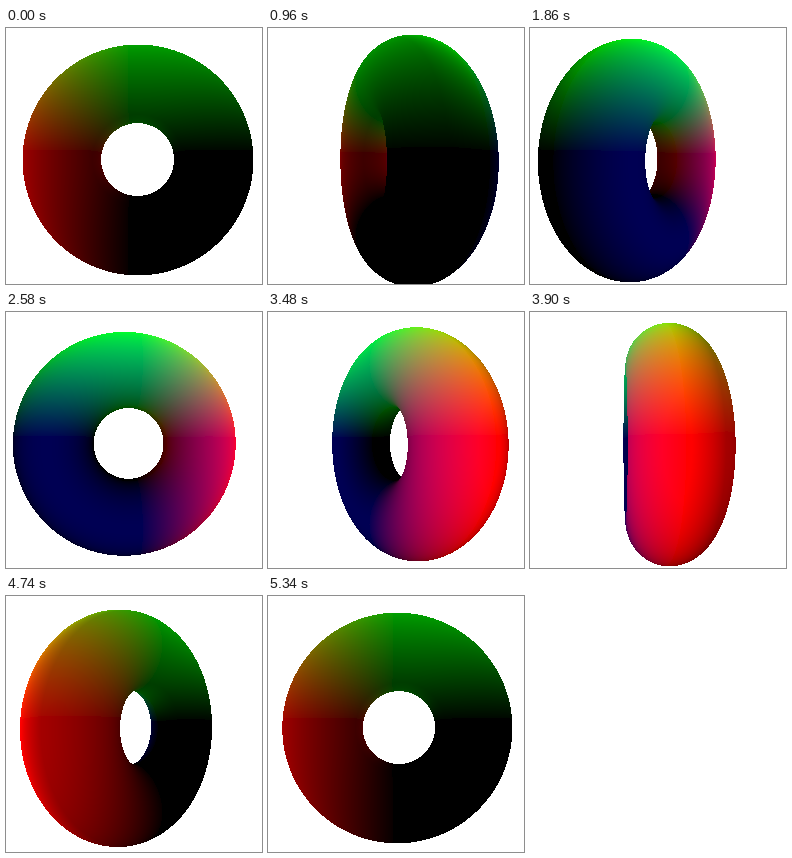
An HTML page with a canvas that plays this animation: 256 by 256 pixels, repeating every 5400 ms.

```html
<!DOCTYPE html>
<html lang="en">
<head>
<meta charset="utf-8">
<title>Turning torus</title>
<style>
html, body { margin: 0; width: 100%; height: 100%; overflow: hidden; background: #fff; }
canvas { display: block; width: 256px; height: 256px; }
</style>
</head>
<body>
<canvas id="stage" width="256" height="256"></canvas>
<script>
const SIZE = 256, HALF = SIZE / 2;
const LOOP = 5400, STEP = 60;
const RING = 72.6, TUBE = 36.2, SHIFT = 3.6; // torus radii and its offset from the pivot
const EYE = 221;                             // camera distance and focal length
const BOUND = (RING + TUBE + 1) ** 2;
const GAIN = 2.55;

const ctx = document.getElementById('stage').getContext('2d');
const image = ctx.createImageData(SIZE, SIZE);
const pixels = new Uint32Array(image.data.buffer);
const WHITE = 0xffffffff;

const clamp = (v, lo, hi) => Math.min(hi, Math.max(lo, v));

// Each channel grows towards the negative end of one axis
const level = (v, light) => {
  const c = Math.min(255, -(v + SHIFT) * GAIN * light);
  return c < 8 ? 0 : Math.round(c);
};

// The rear of the torus is lit, the front is dimmer
function shade(x, y, z) {
  const light = 1 - 0.36 * clamp((z / TUBE + 0.2) / 0.7, 0, 1);
  return (255 << 24 | level(z, light) << 16 | level(y, light) << 8 | level(x, light)) >>> 0;
}

function render(angle) {
  const c = Math.cos(angle), s = Math.sin(angle);
  // Camera in torus space
  const ox = EYE * s - SHIFT, oy = -SHIFT, oz = EYE * c - SHIFT;
  const far = ox * ox + oy * oy + oz * oz - BOUND;

  for (let py = 0, i = 0; py < SIZE; py++) {
    for (let px = 0; px < SIZE; px++, i++) {
      pixels[i] = WHITE;
      const vx = px + 0.5 - HALF, vy = py + 0.5 - HALF;
      const len = Math.sqrt(vx * vx + vy * vy + EYE * EYE);
      const dx = (vx * c - EYE * s) / len;
      const dy = vy / len;
      const dz = (-EYE * c - vx * s) / len;

      // Enter the bounding sphere, then march to the surface
      const b = ox * dx + oy * dy + oz * dz;
      const h = b * b - far;
      if (h < 0) continue;
      const root = Math.sqrt(h), end = root - b;
      let t = -b - root;
      while (t < end) {
        const x = ox + dx * t, y = oy + dy * t, z = oz + dz * t;
        const q = Math.sqrt(x * x + y * y) - RING;
        const dist = Math.sqrt(q * q + z * z) - TUBE;
        if (dist < 0.08) {
          pixels[i] = shade(x, y, z);
          break;
        }
        t += dist;
      }
    }
  }
  ctx.putImageData(image, 0, 0);
}

const start = performance.now();
let shown = -1;
function tick() {
  const time = Math.max(0, performance.now() - start) % LOOP;
  const step = Math.floor(time / STEP);
  if (step !== shown) {
    shown = step;
    render(step * STEP / LOOP * 2 * Math.PI);
  }
  requestAnimationFrame(tick);
}
tick();
</script>
</body>
</html>
```
